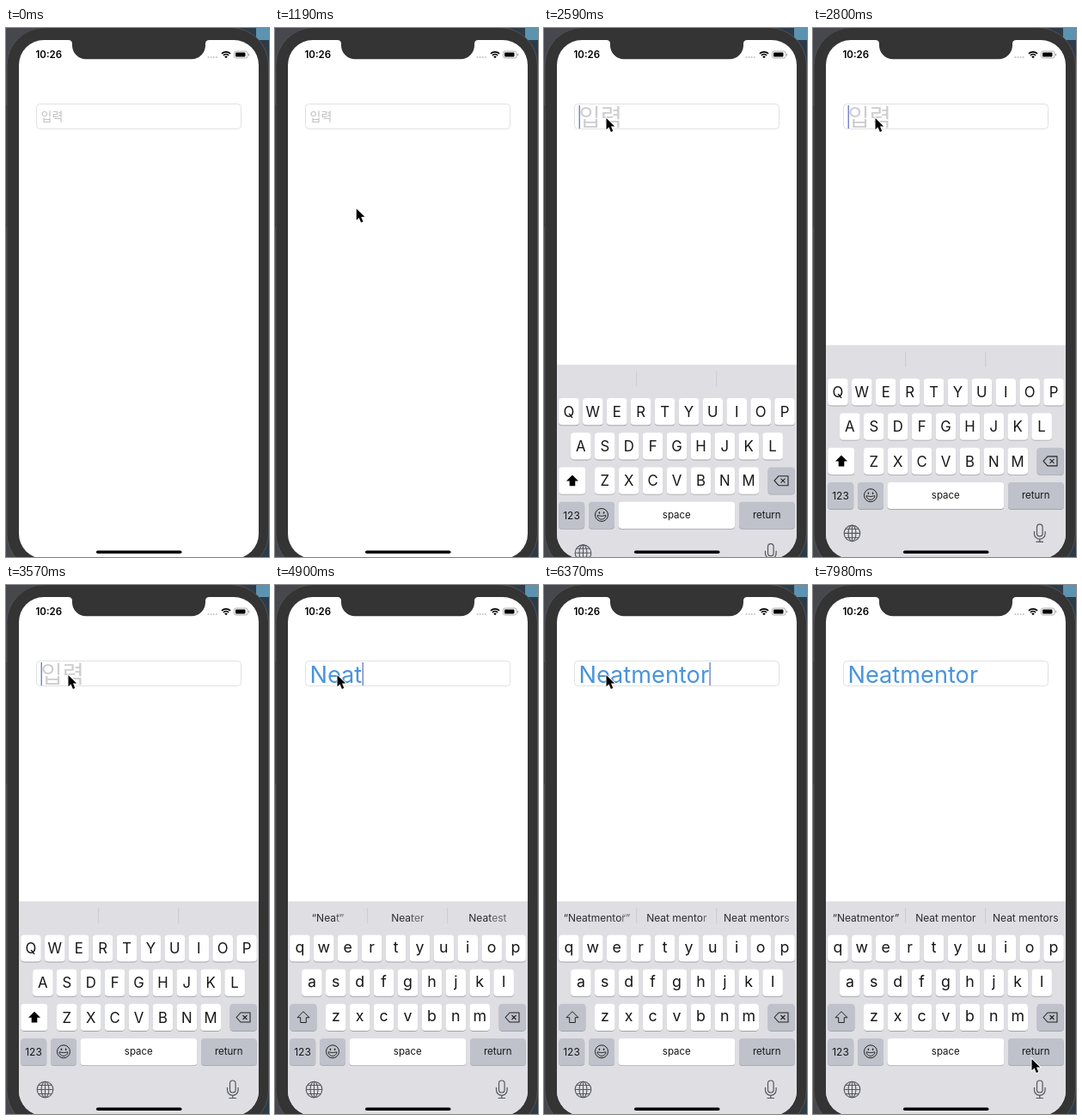
An HTML page with a canvas that plays this animation: 306x616 px, repeating every 8000 ms.

```html
<!DOCTYPE html>
<html lang="ko">
<head>
<meta charset="utf-8">
<title>Text field</title>
<style>
html, body { margin: 0; width: 100%; height: 100%; overflow: hidden; background: #343434; }
canvas { display: block; width: 306px; height: 616px; }
</style>
</head>
<body>
<canvas id="stage"></canvas>
<script>
const W = 306, H = 616, LOOP = 8000, STEP = 70;
const SANS = 'Inter, Roboto, sans-serif';
const HANGUL = '"Noto Sans CJK KR", "Noto Sans CJK", sans-serif';
const BODY = '#343434', KEY_GREY = '#bfc2cb', INK = '#161617', ICON = '#55575c';
const FOCUS = 2374, KEYBOARD_TOP = 368.4;
const ROWS = [0, 1, 2, 3].map(i => 407.4 + i * 40.2);
const PITCH = 27.9;

const WORD = 'Neatmentor';
const KEY_TIMES = [3850, 4130, 4410, 4760, 5040, 5250, 5530, 5740, 6020, 6230];
// Second and third suggestion after each letter; the first is the quoted text.
const GUESSES = [
  ['No', 'Not'], ['New', 'Need'], ['Near', 'Neat'], ['Neater', 'Neatest'],
  ['Neat m', 'Neat my'], ['Neat me', 'Neat men'], ['Neat men', 'Neat mend'],
  ['Neat ment', 'Neat mental'], ['Neat mento', 'Neat mentor'],
  ['Neat mentor', 'Neat mentors']
];

const canvas = document.getElementById('stage');
const dpr = window.devicePixelRatio || 1;
canvas.width = Math.round(W * dpr);
canvas.height = Math.round(H * dpr);
const c = canvas.getContext('2d');

const clamp = v => Math.max(0, Math.min(1, v));
const ramp = (t, a, b) => clamp((t - a) / (b - a));
const easeIn = p => p * p;
const easeOut = p => 1 - (1 - p) ** 2;
const easeOutCubic = p => 1 - (1 - p) ** 3;

function roundPath(x, y, w, h, r) {
  c.beginPath();
  c.roundRect(x, y, w, h, r);
}

function box(x, y, w, h, r, color) {
  roundPath(x, y, w, h, r);
  c.fillStyle = color;
  c.fill();
}

function line(points, close) {
  c.beginPath();
  points.forEach(([x, y], i) => i ? c.lineTo(x, y) : c.moveTo(x, y));
  if (close) c.closePath();
}

function stroke(color, width) {
  c.strokeStyle = color;
  c.lineWidth = width;
  c.stroke();
}

function arc(x, y, r, a = 0, b = Math.PI * 2) {
  c.beginPath();
  c.arc(x, y, r, a, b);
}

function text(str, x, y, size, color, align = 'center', weight = 400, family = SANS) {
  c.font = `${weight} ${size}px ${family}`;
  c.fillStyle = color;
  c.textAlign = align;
  c.fillText(str, x, y);
}

function drawBody() {
  c.fillStyle = '#47484d';
  c.fillRect(0, 0, W, H);
  c.fillStyle = '#26272a';
  c.fillRect(0, 90, 2, 142);
  c.fillStyle = '#2d3b48';
  c.fillRect(153, 0, 153, H);
  c.fillStyle = '#5b93b0';
  c.fillRect(291, 0, 15, 14);
  roundPath(1, -0.5, 304.5, 633, 44);
  c.fillStyle = BODY;
  c.fill();
  stroke('#515255', 1);
}

function drawNotch() {
  const bottom = 36.3, r = 16;
  c.beginPath();
  c.moveTo(72.5, 13);
  c.lineTo(72.5, 14);
  c.quadraticCurveTo(77, 14, 77, 18.5);
  c.arcTo(77, bottom, 77 + r, bottom, r);
  c.lineTo(232 - r, bottom);
  c.arcTo(232, bottom, 232, bottom - r, r);
  c.lineTo(232, 18.5);
  c.quadraticCurveTo(232, 14, 236.5, 14);
  c.lineTo(236.5, 13);
  c.closePath();
  c.fillStyle = BODY;
  c.fill();
}

function drawStatus() {
  text('10:26', 34.5, 35, 11.5, '#000', 'left', 600);
  for (let i = 0; i < 4; i++) {
    arc(235.5 + i * 3.1, 34, 1);
    c.fillStyle = '#c4c4c6';
    c.fill();
  }
  const up = -Math.PI / 2, spread = 0.78;
  for (const r of [7.2, 4.4]) {
    arc(256, 35, r, up - spread, up + spread);
    stroke('#000', 1.7);
  }
  c.beginPath();
  c.moveTo(256, 35.2);
  c.arc(256, 35.2, 2.6, up - spread, up + spread);
  c.fillStyle = '#000';
  c.fill();
  roundPath(265.5, 27, 15.5, 8, 2.2);
  stroke('#a5a5a7', 0.9);
  box(267, 28.5, 11.5, 5, 1, '#000');
  box(282, 29.7, 1.1, 2.8, 0.6, '#a5a5a7');
}

function caretAlpha(t, last) {
  const s = Math.max(0, t - last) % 1000;
  return s < 540 ? 1 : s < 900 ? 1 - ramp(s, 540, 700) : ramp(s, 900, 1000);
}

function drawField(t, count) {
  roundPath(35.5, 88.5, 238, 29, 4);
  c.fillStyle = '#fff';
  c.fill();
  stroke('#e1e1e3', 1);
  const focused = t >= FOCUS;
  c.save();
  c.beginPath();
  c.rect(36, 89, 237, 28);
  c.clip();
  let caretX = 41.3;
  if (count) {
    const typed = WORD.slice(0, count);
    text(typed, 40.5, 113.8, 27.2, '#4a94dc', 'left');
    caretX = 41.5 + c.measureText(typed).width;
  } else if (focused) {
    text('입력', 40.5, 113.5, 27.4, '#cdcdd0', 'left', 300, HANGUL);
  } else {
    text('입력', 40.5, 107.8, 14, '#c0c0c4', 'left', 300, HANGUL);
  }
  if (focused) {
    c.globalAlpha = caretAlpha(t, count ? KEY_TIMES[count - 1] : 2565);
    c.fillStyle = '#6878c4';
    c.fillRect(caretX - 0.7, 90, 1.3, 27);
  }
  c.restore();
}

function keyCap(x, y, w, color = '#fff') {
  box(x, y + 0.9, w, 31.2, 3.8, '#a3a5aa');
  box(x, y, w, 31.2, 3.8, color);
}

function letterRow(letters, firstX, y, upper) {
  [...letters].forEach((ch, i) => {
    const x = firstX + i * PITCH;
    keyCap(x - 11.8, y, 23.6);
    if (upper) text(ch.toUpperCase(), x, y + 21.8, 16.8, INK);
    else text(ch, x, y + 20.4, 17.8, INK);
  });
}

function shiftIcon(upper) {
  line([[33, 496.7], [40, 503.7], [36.3, 503.7], [36.3, 509.5],
        [29.7, 509.5], [29.7, 503.7], [26, 503.7]], true);
  c.lineJoin = 'round';
  if (upper) {
    c.fillStyle = '#000';
    c.fill();
  } else stroke('#222', 1);
}

function deleteIcon() {
  line([[268, 503.5], [273, 498], [284, 498], [284, 509], [273, 509]], true);
  stroke('#222', 1.1);
  for (const d of [-2.5, 2.5]) {
    line([[278 - d, 501], [278 + d, 506]]);
    stroke('#222', 1.1);
  }
}

function emojiIcon() {
  arc(67, 543.3, 7.5);
  stroke('#222', 1);
  for (const x of [64.4, 69.6]) {
    c.beginPath();
    c.ellipse(x, 540.8, 0.8, 1.2, 0, 0, Math.PI * 2);
    c.fillStyle = '#222';
    c.fill();
  }
  c.beginPath();
  c.moveTo(62, 543.8);
  c.quadraticCurveTo(67, 545.6, 72, 543.8);
  c.bezierCurveTo(71.3, 550, 62.7, 550, 62, 543.8);
  stroke('#222', 0.9);
}

function globeIcon() {
  const x = 45.5, y = 587.5;
  for (const rx of [9.3, 4.4]) {
    c.beginPath();
    c.ellipse(x, y, rx, 9.3, 0, 0, Math.PI * 2);
    stroke(ICON, 1.1);
  }
  for (const [dx, dy] of [[0, 9.3], [9.3, 0]]) {
    line([[x - dx, y - dy], [x + dx, y + dy]]);
    stroke(ICON, 1.1);
  }
  for (const dy of [-5, 5]) {
    line([[x - 7.8, y + dy], [x + 7.8, y + dy]]);
    stroke(ICON, 1);
  }
}

function micIcon() {
  roundPath(260.5, 577, 6.6, 14, 3.3);
  stroke(ICON, 1.2);
  c.beginPath();
  c.moveTo(257.5, 585);
  c.lineTo(257.5, 588);
  c.arc(263.8, 588, 6.3, Math.PI, 0, true);
  c.lineTo(270.1, 585);
  stroke(ICON, 1.2);
  line([[263.8, 594.3], [263.8, 597.5]]);
  stroke(ICON, 1.2);
  line([[259.5, 597.5], [268, 597.5]]);
  stroke(ICON, 1.2);
}

function suggestions(count) {
  if (!count) return ['', '', ''];
  return [`“${WORD.slice(0, count)}”`, ...GUESSES[count - 1]];
}

// Letters shared with the previous suggestion stay; the rest cross-fades.
function drawSuggestions(t, count) {
  if (!count) return;
  const p = ramp(t, KEY_TIMES[count - 1] + 40, KEY_TIMES[count - 1] + 190);
  const before = suggestions(count - 1);
  suggestions(count).forEach((now, i) => {
    const old = before[i];
    let n = 0;
    while (n < now.length && now[n] === old[n]) n++;
    c.font = `400 12px ${SANS}`;
    const x = [61.5, 154.3, 247.3][i] - c.measureText(now).width / 2;
    const head = now.slice(0, n), tailX = x + c.measureText(head).width;
    const put = (str, at, alpha) => {
      c.globalAlpha = alpha;
      text(str, at, 391.5, 12, '#2c2c2f', 'left');
    };
    put(head, x, 1);
    put(now.slice(n), tailX, p);
    put(old.slice(n), tailX, 1 - p);
    c.globalAlpha = 1;
  });
}

function drawKeyboard(t, count) {
  if (t < FOCUS) return;
  // Critically damped spring
  const k = 18.26 * (t - FOCUS) / 1000;
  const drop = (H - KEYBOARD_TOP) * (1 + k) * Math.exp(-k);
  const upper = count === 0;
  c.save();
  c.translate(0, drop < 0.3 ? 0 : drop);
  c.fillStyle = '#dedee3';
  c.fillRect(15, KEYBOARD_TOP, 279, 260);
  c.fillStyle = '#c6c6cc';
  for (const x of [107.3, 200.3]) c.fillRect(x, 376, 0.8, 18);
  drawSuggestions(t, count);

  const first = 28.95;
  letterRow('qwertyuiop', first, ROWS[0], upper);
  letterRow('asdfghjkl', first + PITCH / 2, ROWS[1], upper);
  letterRow('zxcvbnm', first + PITCH * 1.5, ROWS[2], upper);
  keyCap(17.2, ROWS[2], 31.2, upper ? '#fff' : KEY_GREY);
  shiftIcon(upper);
  keyCap(260.6, ROWS[2], 31.2, KEY_GREY);
  deleteIcon();
  keyCap(17.2, ROWS[3], 30, KEY_GREY);
  text('123', 32, 548, 12, INK);
  keyCap(52, ROWS[3], 30, KEY_GREY);
  emojiIcon();
  keyCap(86.5, ROWS[3], 135.7);
  text('space', 154.3, 547, 11.5, INK);
  keyCap(227, ROWS[3], 64.8, KEY_GREY);
  text('return', 259.3, 547, 11.5, INK);
  globeIcon();
  micIcon();
  c.restore();
}

const PATH = [
  { from: 840, to: 1890, a: [147, 460], b: [72, 104], ease: easeOutCubic },
  { from: 6790, to: 7560, a: [72, 104], b: [152, 300], ease: easeIn },
  { from: 7560, to: 7910, a: [152, 300], b: [254, 551], ease: easeOut }
];

function drawPointer(t) {
  if (t < 560) return;
  const leg = PATH.filter(s => t >= s.from).pop() || PATH[0];
  const p = leg.ease(ramp(t, leg.from, leg.to));
  const [x, y] = leg.a.map((v, i) => v + (leg.b[i] - v) * p);
  c.save();
  c.translate(x, y + 0.4);
  c.scale(1.05, 1.05);
  line([[0.5, 0.5], [0.5, 13.2], [3.4, 10.5], [5.6, 15.8], [7.9, 14.8],
        [5.7, 9.7], [9.7, 9.5]], true);
  c.lineJoin = 'miter';
  stroke('#fff', 1.6);
  c.fillStyle = '#000';
  c.fill();
  c.restore();
}

function draw(t) {
  const count = KEY_TIMES.filter(k => t >= k).length;
  c.setTransform(dpr, 0, 0, dpr, 0, 0);
  drawBody();
  c.save();
  roundPath(15, 14, 279, 604, 29);
  c.clip();
  c.fillStyle = '#fff';
  c.fillRect(15, 14, 279, 604);
  drawStatus();
  drawField(t, count);
  drawKeyboard(t, count);
  box(105, 608.4, 99.5, 3.6, 1.8, '#000');
  c.restore();
  drawNotch();
  drawPointer(t);
}

function tick() {
  const t = performance.now() % LOOP;
  draw(Math.floor(t / STEP) * STEP);
  requestAnimationFrame(tick);
}
tick();
</script>
</body>
</html>
```
